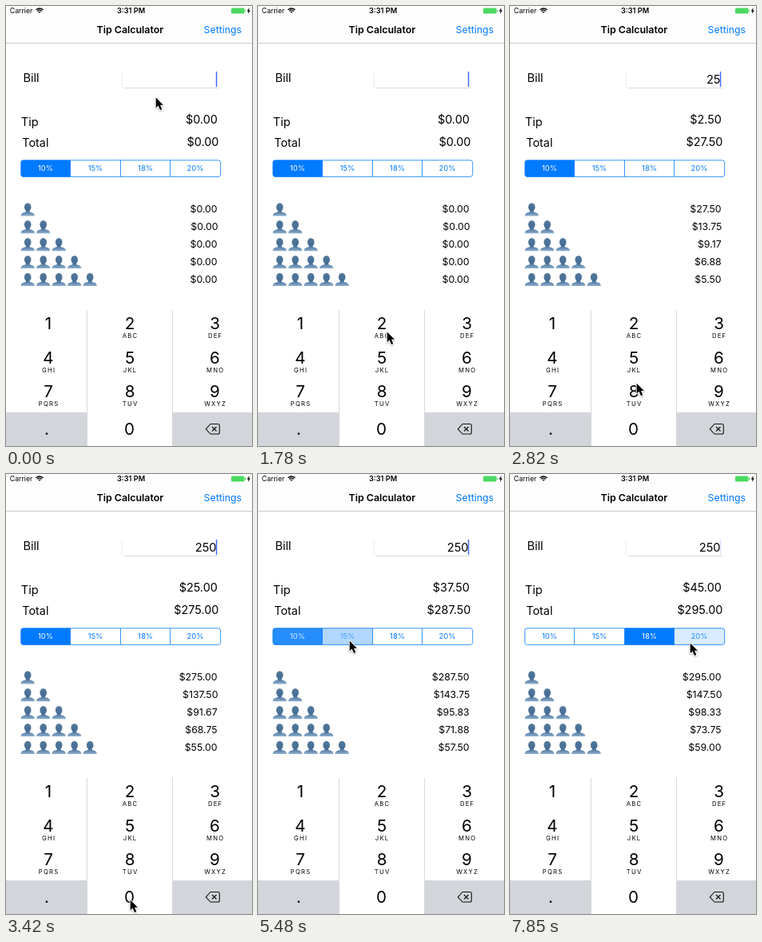
An HTML page with a canvas for the animation above (8000 ms loop, 308 by 550 pixels).

```html
<!DOCTYPE html>
<html>
<head>
<meta charset="utf-8">
<style>
  html, body { margin: 0; width: 100%; height: 100%; overflow: hidden; background: #fff; }
  canvas { display: block; width: 308px; height: 550px; }
</style>
</head>
<body>
<canvas id="stage"></canvas>
<script>
const W = 308, H = 550, LOOP = 8000, TICK = 148.1;
const BLUE = '#007aff', GREY = '#d2d5da';
const canvas = document.getElementById('stage');
const ctx = canvas.getContext('2d');
const dpr = window.devicePixelRatio || 1;
canvas.width = W * dpr;
canvas.height = H * dpr;
ctx.scale(dpr, dpr);

const RATES = [10, 15, 18, 20];
const EDGES = [18.5, 80.5, 143.5, 205.5, 268.5];
const LETTERS = ['', 'ABC', 'DEF', 'GHI', 'JKL', 'MNO', 'PQRS', 'TUV', 'WXYZ'];
const KEY_X = [0, 102, 209, 308];
const KEY_Y = [380, 423, 465, 508, 550];

// Pointer path: tick, x, y
const PATH = [
  [0, 187, 113], [3, 176, 131], [6, 176, 131], [12, 161, 406], [13, 161, 406],
  [14, 160, 434], [15, 159, 449], [18, 159, 449], [21, 155, 531], [24, 155, 531],
  [32, 128, 209], [34, 114, 207], [38, 114, 207], [41, 160, 202], [46, 160, 202],
  [50, 225, 210]
];

// Segment fills from a given tick on
const FILLS = [
  [0, [1, 0, 0, 0]], [36, [1, .15, 0, 0]], [37, [.85, .3, 0, 0]], [38, [0, 1, 0, 0]],
  [45, [0, .4, .7, 0]], [46, [0, 0, 1, 0]], [53, [0, 0, 1, .15]]
];

function pointerAt(n) {
  const i = PATH.findIndex(p => p[0] > n);
  if (i < 0) return PATH[PATH.length - 1].slice(1);
  const [t0, x0, y0] = PATH[i - 1], [t1, x1, y1] = PATH[i];
  const u = (n - t0) / (t1 - t0), e = u * u * (3 - 2 * u);
  return [x0 + (x1 - x0) * e, y0 + (y1 - y0) * e];
}

function caretAlpha(n) {
  if (n >= 14 && n < 23) return 1;
  const phase = (n * TICK + (n < 14 ? 300 : 700)) % 1000;
  return phase < 500 ? 1 : phase < 560 ? .2 : 0;
}

function text(str, x, y, size, { color = '#000', align = 'left', weight = 400, gap = 0 } = {}) {
  ctx.font = `${weight} ${size}px Inter, "Liberation Sans", sans-serif`;
  ctx.letterSpacing = gap + 'px';
  ctx.textAlign = align;
  ctx.fillStyle = color;
  ctx.fillText(str, x, y);
}

function rect(x, y, w, h, color) {
  ctx.fillStyle = color;
  ctx.fillRect(x, y, w, h);
}

function stroke(path, color, width) {
  ctx.strokeStyle = color;
  ctx.lineWidth = width;
  ctx.stroke(path);
}

function header() {
  rect(0, 0, W, 46, '#fdfdfd');
  rect(0, 46, W, 1, '#cbcbcd');
  text('Carrier', 4.8, 9, 8.7);
  for (const r of [1.4, 3.7, 6]) {
    const arc = new Path2D();
    arc.arc(42, 9, r, -Math.PI * .76, -Math.PI * .24);
    stroke(arc, '#000', 1.4);
  }
  text('3:31 PM', 156.5, 9, 9.2, { align: 'center', weight: 600 });
  ctx.fillStyle = '#4cd964';
  ctx.beginPath();
  ctx.roundRect(282, 2.5, 16.5, 7, 1.5);
  ctx.fill();
  rect(299, 4.5, 1, 3, '#4cd964');
  ctx.fillStyle = '#000';
  ctx.fill(new Path2D('M304.6 2 L301.8 6.5 H303.6 L302.8 10 L306 5.4 H304.2 Z'));
  text('Tip Calculator', 155.3, 34.3, 12.4, { align: 'center', weight: 600 });
  text('Settings', 295, 34.3, 12.3, { color: BLUE, align: 'right' });
}

function billField(bill, caret) {
  text('Bill', 21.5, 95.3, 14.6);
  rect(147, 102, 119, 1, '#d9d9d9');
  rect(144.5, 82, 1, 20, '#ececec');
  text(bill, 263.5, 96.6, 14.6, { align: 'right' });
  ctx.globalAlpha = caret;
  rect(262.8, 82, 1.5, 19, '#426bf2');
  ctx.globalAlpha = 1;
}

function segments(fills) {
  const box = new Path2D();
  box.roundRect(18.7, 192.8, 250, 20.6, 3);
  ctx.save();
  ctx.clip(box);
  fills.forEach((a, i) => {
    rect(EDGES[i], 192, EDGES[i + 1] - EDGES[i], 22, `rgba(0,122,255,${a})`);
  });
  ctx.restore();
  stroke(box, BLUE, .8);
  for (const x of EDGES.slice(1, 4)) rect(x - .4, 193, .8, 20, BLUE);
  fills.forEach((a, i) => {
    const color = `rgb(${255 * a},${122 + 133 * a},255)`;
    text(RATES[i] + '%', (EDGES[i] + EDGES[i + 1]) / 2, 206.4, 9.4, { color, align: 'center' });
  });
}

function person(x, y) {
  const shade = ctx.createLinearGradient(0, y - 8, 0, y + 8);
  shade.addColorStop(0, '#527899');
  shade.addColorStop(.6, '#456d96');
  shade.addColorStop(1, '#8fb0d0');
  ctx.fillStyle = shade;
  ctx.beginPath();
  ctx.ellipse(x, y - 3, 4.3, 5.2, 0, 0, Math.PI * 2);
  ctx.fill();
  ctx.fill(new Path2D(`M${x - 2.4} ${y} V${y + 2.8} C${x - 5} ${y + 4} ${x - 8.6} ${y + 4} ${x - 8.6} ${y + 8}
    H${x + 8.6} C${x + 8.6} ${y + 4} ${x + 5} ${y + 4} ${x + 2.4} ${y + 2.8} V${y} Z`));
}

function amounts(bill, rate) {
  const money = v => '$' + v.toFixed(2);
  const total = bill * (100 + rate) / 100;
  const right = { align: 'right' };
  text('Tip', 18.8, 150.2, 14.6);
  text('Total', 20.3, 176.4, 14.4);
  text(money(bill * rate / 100), 264.8, 147.2, 14.4, right);
  text(money(total), 266.4, 175.2, 14.4, right);
  for (let i = 0; i < 5; i++) {
    const y = 254 + i * 21.9;
    for (let k = 0; k <= i; k++) person(27.2 + k * 19.5, y + .4);
    text(money(total / (i + 1)), i === 1 ? 265.4 : 264.6, y + 4.3, 12.3, right);
  }
}

function keypad(pressed) {
  const mid = { align: 'center' };
  const centers = [53, 155, 261.5];
  rect(0, 508, 102, 42, GREY);
  rect(209, 508, 99, 42, GREY);
  if (pressed >= 0) {
    const slot = pressed === 0 ? 10 : pressed - 1;
    const c = slot % 3, r = Math.floor(slot / 3);
    rect(KEY_X[c], KEY_Y[r], KEY_X[c + 1] - KEY_X[c], KEY_Y[r + 1] - KEY_Y[r], GREY);
  }
  rect(101, 380, 1, 170, '#d8d9db');
  rect(208, 380, 1, 170, '#d8d9db');
  LETTERS.forEach((label, i) => {
    const x = centers[i % 3], y = 404.3 + Math.floor(i / 3) * 42.3;
    text(String(i + 1), x, y, 20.6, mid);
    text(label, x + .6, y + 11, 7.7, { align: 'center', gap: 1.2 });
  });
  text('0', 154.5, 536, 20.6, mid);
  text('.', 51, 535.5, 20.6, mid);
  ctx.lineJoin = 'round';
  stroke(new Path2D('M256 522.5 H265.3 Q267.3 522.5 267.3 524.5 V533 Q267.3 535 265.3 535 H256 L250.3 528.8 Z'), '#111', 1.1);
  stroke(new Path2D('M258 526 L263.5 531.5 M263.5 526 L258 531.5'), '#111', 1.1);
}

function pointer(x, y) {
  ctx.save();
  ctx.translate(x + .7, y + 1.5);
  const arrow = new Path2D('M0 0 V12.8 L2.9 10.1 L5.3 15.5 L7.6 14.5 L5.3 9.2 H9.2 Z');
  ctx.shadowColor = 'rgba(0,0,0,.3)';
  ctx.shadowBlur = 2 * dpr;
  ctx.shadowOffsetY = dpr;
  stroke(arrow, '#fff', 2);
  ctx.shadowColor = 'transparent';
  ctx.fillStyle = '#000';
  ctx.fill(arrow);
  ctx.restore();
}

function draw(now) {
  const n = Math.floor((now % LOOP + 6) / TICK);
  const bill = n < 14 ? '' : n < 18 ? '2' : n < 23 ? '25' : '250';
  const rate = n < 37 ? 10 : n < 45 ? 15 : 18;
  const key = { 13: 2, 17: 5, 22: 0 }[n] ?? -1;
  rect(0, 0, W, H, '#fff');
  header();
  billField(bill, caretAlpha(n));
  amounts(Number(bill), rate);
  segments(FILLS.filter(f => f[0] <= n).pop()[1]);
  keypad(key);
  pointer(...pointerAt(n));
}

let start;
function loop(now) {
  start ??= now;
  draw(now - start);
  requestAnimationFrame(loop);
}
draw(0);
requestAnimationFrame(loop);
</script>
</body>
</html>
```
